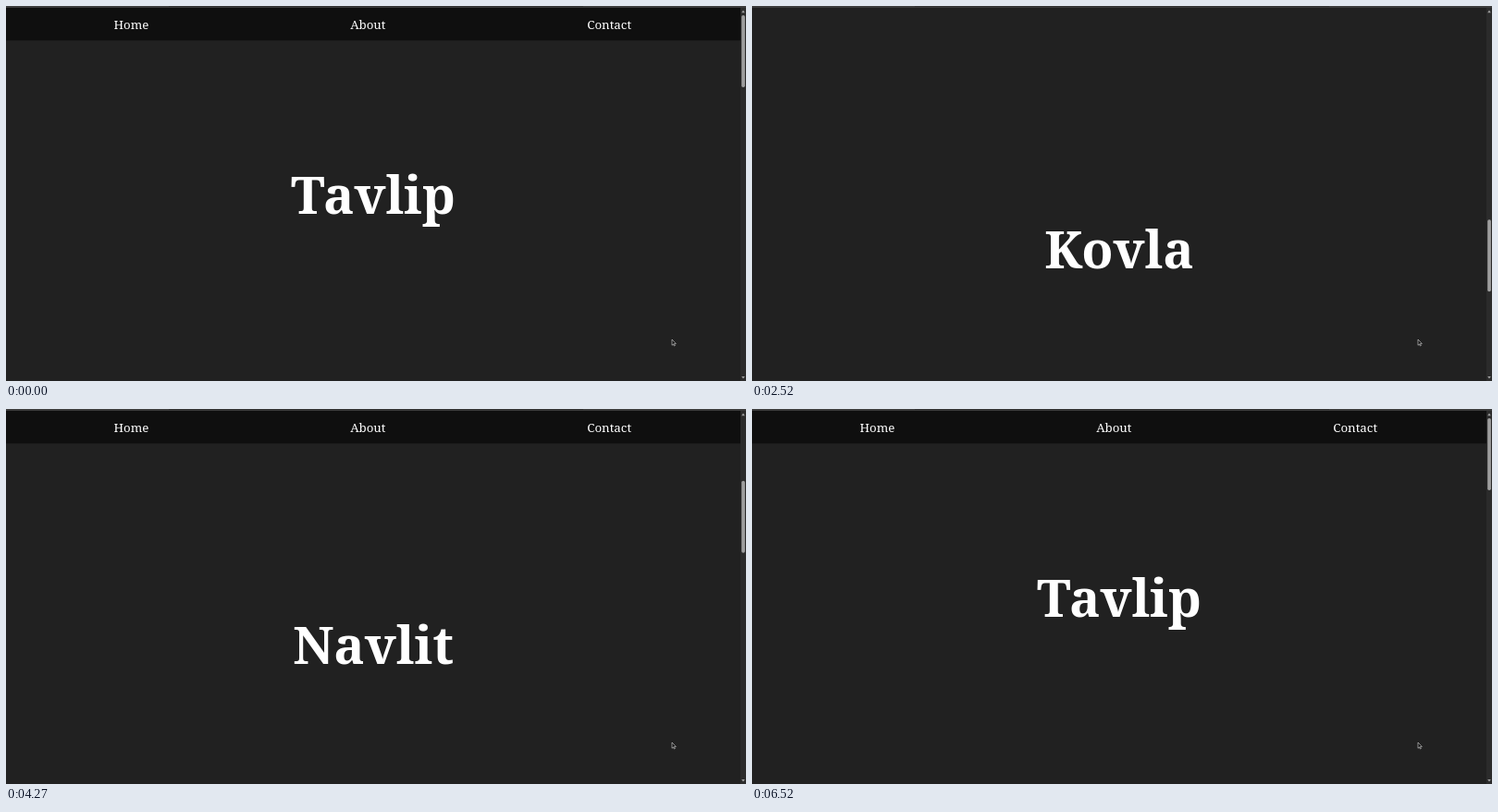
Animation, 800 px wide and 406 px high, one loop 7730 ms. Source, as an HTML page:

```html
<!DOCTYPE html>
<html lang="en">
<head>
<meta charset="utf-8">
<title>Scrolling page</title>
<style>
  html, body { margin: 0; width: 100%; height: 100%; overflow: hidden; background: #212121; }
  svg { display: block; width: 100%; height: 100%; }
  text { font-family: "Roboto Slab", "Noto Serif", serif; fill: #fff; text-anchor: middle; }
  .name { font-size: 56px; font-weight: 700; }
  .link { font-size: 13.3px; }
</style>
</head>
<body>
<svg viewBox="0 0 800 406">
  <rect width="800" height="406" fill="#212121"/>
  <g id="page"></g>
  <g id="nav">
    <rect y="2" width="794" height="35.3" fill="#0f0f0f"/>
    <text class="link" x="135.5" y="25">Home</text>
    <text class="link" x="391.3" y="25">About</text>
    <text class="link" x="652.2" y="25">Contact</text>
  </g>
  <rect x="794" width="6" height="406" fill="#2b2b2b"/>
  <path d="M795.2 7.2h3.6l-1.8-2.6zM795.2 401h3.6l-1.8 2.6z" fill="#a0a0a0"/>
  <rect id="thumb" x="795.2" y="10" width="3.7" height="78" rx="1.8" fill="#9f9f9f"/>
  <rect width="800" height="2" fill="#3b3b3b"/>
  <rect x="176" width="448" height="1" fill="#303030"/>
  <path d="M720 361v6.3l1.4-1.3 1 2 .9-.4-.9-2h1.9z" fill="#111" stroke="#ddd" stroke-width=".6"/>
</svg>
<script>
const LOOP = 7730;
const VIEW = 404;
const NAV_H = 35.3;
const THUMB_RATIO = 310 / (4 * VIEW);
const names = ["Tavlip", "Navlit", "Tivilesh", "Kovla"];

// [time, scroll offset]
const keys = [
  [0, 0], [645, 0], [910, 95], [1230, 208],
  [1435, 208], [1850, 688], [2210, 1020], [2520, 1153],
  [2630, 1153], [2840, 1195],
  [3010, 1195], [3190, 1153],
  [3505, 1153], [3580, 1127], [4100, 560], [4400, 210], [4660, 0],
  [5270, 0], [5300, 1], [5480, 95], [5720, 208],
  [5840, 208], [6060, 150], [6300, 50], [6510, 0], [LOOP, 0]
];

// [start, hidden afterwards]
const navMoves = [[730, 1], [3050, 0], [5365, 1], [5890, 0]];
const NAV_TIME = 300;

const page = document.getElementById("page");
const nav = document.getElementById("nav");
const thumb = document.getElementById("thumb");

names.forEach((name, i) => {
  const el = document.createElementNS("http://www.w3.org/2000/svg", "text");
  el.setAttribute("class", "name");
  el.setAttribute("x", 397);
  el.setAttribute("y", 225.3 + i * VIEW);
  el.textContent = name;
  page.append(el);
});

const slope = i => (keys[i + 1][1] - keys[i][1]) / (keys[i + 1][0] - keys[i][0]);

// Harmonic mean keeps the curve from overshooting at rests.
function tangent(i) {
  if (i === 0 || i === keys.length - 1) return 0;
  const a = slope(i - 1), b = slope(i);
  return a * b > 0 ? 2 * a * b / (a + b) : 0;
}

function scrollAt(t) {
  let i = 0;
  while (i < keys.length - 2 && t >= keys[i + 1][0]) i++;
  const [t0, a] = keys[i], [t1, b] = keys[i + 1];
  const d = t1 - t0, u = (t - t0) / d, v = 1 - u;
  return v * v * (1 + 2 * u) * a + u * u * (3 - 2 * u) * b
    + d * u * v * (v * tangent(i) - u * tangent(i + 1));
}

// CSS "ease": cubic-bezier(.25, .1, .25, 1)
function ease(x) {
  if (x <= 0) return 0;
  if (x >= 1) return 1;
  let lo = 0, hi = 1;
  for (let n = 0; n < 24; n++) {
    const s = (lo + hi) / 2, r = 1 - s;
    if (0.75 * r * s + s * s * s < x) lo = s; else hi = s;
  }
  const s = lo, r = 1 - s;
  return 0.3 * r * r * s + 3 * r * s * s + s * s * s;
}

function hiddenAt(t) {
  let h = 0;
  for (const [start, to] of navMoves) h += (to - h) * ease((t - start) / NAV_TIME);
  return h;
}

function draw(t) {
  const y = scrollAt(t);
  page.setAttribute("transform", `translate(0 ${-y})`);
  thumb.setAttribute("y", 10 + y * THUMB_RATIO);
  nav.setAttribute("transform", `translate(0 ${-NAV_H * hiddenAt(t)})`);
}

const begin = performance.now();
function tick() {
  draw((performance.now() - begin) % LOOP);
  requestAnimationFrame(tick);
}
tick();
</script>
</body>
</html>
```
